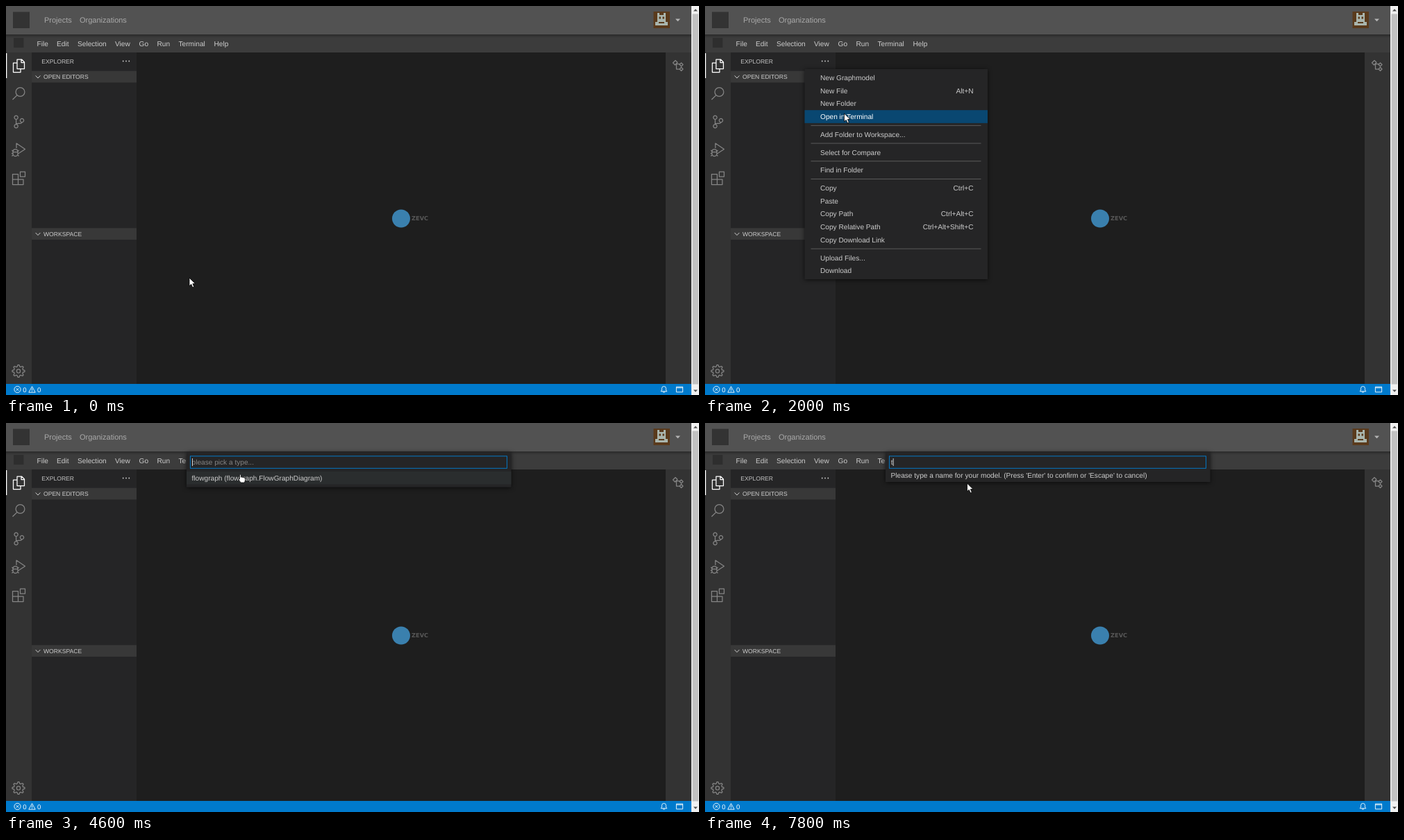
Animation, 998 px wide and 561 px high, one loop 8 s. Source, as an HTML page:

```html
<!DOCTYPE html>
<html lang="en">
<head>
<meta charset="utf-8">
<title>Workspace: new graph model</title>
<style>
html, body { margin: 0; width: 100%; height: 100%; overflow: hidden; background: #1e1e1e; }
svg { display: block; width: 998px; height: 561px; }
text { font-family: "Liberation Sans", Arial, sans-serif; text-rendering: geometricPrecision; white-space: pre; }
.icon { fill: none; stroke: #858585; stroke-width: 1.25; stroke-linejoin: round; }
.shadow { filter: drop-shadow(0 1px 3px #000a); }
</style>
</head>
<body>
<svg id="stage" viewBox="0 0 998 561">
  <defs>
    <linearGradient id="fade" x2="0" y2="1">
      <stop offset="0" stop-color="#000" stop-opacity=".3"/>
      <stop offset="1" stop-color="#000" stop-opacity="0"/>
    </linearGradient>
  </defs>
</svg>
<script>
const LOOP = 8000, STEP = 100, BLINK = 600;
const MENU_OPEN = 1100, PICK_OPEN = 3300, PICK_CLOSE = 6100, NAME_OPEN = 6200, TYPED = 7800;
const SMALL = 8.58, BODY = 10.15;
const stage = document.getElementById('stage');

function add(parent, tag, attrs, content) {
  const node = document.createElementNS('http://www.w3.org/2000/svg', tag);
  for (const key in attrs) node.setAttribute(key, attrs[key]);
  if (content) node.textContent = content;
  parent.appendChild(node);
  return node;
}
const group = (parent, attrs = {}) => add(parent, 'g', attrs);
const rect = (parent, x, y, width, height, fill, more) =>
  add(parent, 'rect', { x, y, width, height, fill, ...more });
const label = (parent, x, y, content, size = BODY, fill = '#ccc', more) =>
  add(parent, 'text', { x, y, 'font-size': size, fill, ...more }, content);
const icon = (parent, x, y, d, more) =>
  add(parent, 'path', { d, class: 'icon', transform: `translate(${x} ${y})`, ...more });
const ring = r => `M${-r} 0a${r} ${r} 0 1 0 ${2 * r} 0a${r} ${r} 0 1 0 ${-2 * r} 0`;
const show = (node, on) => node.setAttribute('visibility', on ? 'visible' : 'hidden');

function drawHeader(g) {
  rect(g, 0, 0, 987, 41, '#525252');
  rect(g, 0, 41, 987, 26, '#3c3c3c');
  rect(g, 0, 41, 987, 5, 'url(#fade)');
  rect(g, 10, 8.5, 24, 23.5, '#333');
  rect(g, 11, 46, 14.5, 14, '#2e2e2e');
  label(g, 55, 24, 'Projects', 11, '#a9a9a9');
  label(g, 106, 24, 'Organizations', 11, '#a9a9a9');
  const names = ['File', 'Edit', 'Selection', 'View', 'Go', 'Run', 'Terminal', 'Help'];
  const lefts = [44.5, 73, 103, 157, 191.5, 217.5, 248.5, 299.5];
  names.forEach((name, i) => label(g, lefts[i], 57.8, name));
  drawAvatar(g);
  add(g, 'path', { d: 'M964 18.5h7l-3.5 3.7z', fill: '#b5b5b5' });
}

function drawAvatar(parent) {
  const g = group(parent, { transform: 'translate(932 8)' }), tone = '#a9b5ad', dark = '#5a3a1c';
  rect(g, 0.5, 0, 23.5, 24, dark);
  rect(g, 6, 2, 12, 13, tone);
  rect(g, 9, 2, 6, 3, dark);
  rect(g, 8.5, 7.5, 2.5, 3, dark);
  rect(g, 13.5, 7.5, 2.5, 3, dark);
  rect(g, 3, 15, 18, 5, tone);
  rect(g, 8, 15, 8, 2, dark);
}

function drawActivityBar(g) {
  rect(g, 0, 67, 37, 478, '#333');
  rect(g, 0, 68, 1.3, 36, '#fff');
  icon(g, 18, 86, 'M-2-9H4.5L8.5-5V4.5H-2zM4-9V-4.5H8.5M-2-4H-7.5V9.5H3V4.5', { style: 'stroke:#fff' });
  icon(g, 20.5, 124, ring(6.4) + 'M-4.5 4.6L-11 11');
  const dot = (x, y) => `M${x - 2.6} ${y}a2.6 2.6 0 1 0 5.2 0a2.6 2.6 0 1 0 -5.2 0`;
  icon(g, 18, 167, dot(-3.4, -6.2) + dot(-3.4, 6.2) + dot(5, -2) + 'M-3.4-3.6V3.6M5 .6C5 4-3.4 1-3.4 3.6');
  icon(g, 18, 207, 'M-3-2V-9L9.5-.5L1 5M-8 2.5a3.6 3.6 0 0 1 7 0V6a3.5 3.5 0 0 1-7 0zM-8 3.5h7M-9.5 1l2 2M.5 1l-2 2M-10 5.5h2M-1 5.5h2M-9.5 9.5l2-2M.5 9.5l-2-2');
  icon(g, 18, 248, 'M-8.5-5.5H-.5V9.5H-8.5zM-8.5 2H7V9.5H-.5M7 2V9.5M2.5-9H9.5V-2H2.5z');
  let gear = '';
  for (let i = 0; i < 32; i++) {
    const a = (i - 0.5) * Math.PI / 16, r = i % 4 < 2 ? 9 : 6.6;
    gear += `${i ? 'L' : 'M'}${(r * Math.cos(a)).toFixed(2)} ${(r * Math.sin(a)).toFixed(2)}`;
  }
  icon(g, 18, 526.5, gear + 'z' + ring(2.6));
}

function drawSection(g, y, name) {
  rect(g, 37, y, 151, 16.7, '#383838');
  icon(g, 46, y + 8.5, 'M-3.4-1.8L0 1.8L3.4-1.8', { style: 'stroke:#ccc;stroke-width:1' });
  label(g, 54, y + 11.4, name, SMALL);
}

function drawFrame(g) {
  drawActivityBar(g);
  rect(g, 37, 67, 151, 478, '#252526');
  label(g, 51.3, 82.5, 'EXPLORER', SMALL, '#c4c4c4');
  for (const x of [168.7, 173, 177.3]) add(g, 'circle', { cx: x, cy: 79.5, r: 0.9, fill: '#ccc' });
  drawSection(g, 93.7, 'OPEN EDITORS');
  drawSection(g, 320.3, 'WORKSPACE');

  rect(g, 188, 67, 762, 478, '#1e1e1e');
  add(g, 'circle', { cx: 569, cy: 306.5, r: 13, fill: '#3a80ae' });
  label(g, 584, 309.3, 'ZEVC', 8.3, '#585858', { style: 'font:bold 8.3px "DejaVu Sans",sans-serif' });

  rect(g, 950, 67, 37, 478, '#333');
  icon(g, 967.5, 86, 'M-7-4L-3.5-7.5L-.5-4.5L-4-1zM2.5-1.5L5-4L7.5-1.5L5 1zM2.5 5L5 2.5L7.5 5L5 7.5zM-2-2.5H3M-2-2.5V5H2.5');

  rect(g, 0, 545, 987, 16, '#007acc');
  const white = { style: 'stroke:#fff;stroke-width:.9' };
  icon(g, 16.5, 553, ring(4.6) + 'M-1.8-1.8L1.8 1.8M1.8-1.8L-1.8 1.8', white);
  label(g, 24.2, 556.6, '0', 9.6, '#fff');
  icon(g, 37.5, 553, 'M0-4.3L4.7 4.2H-4.7zM0-1.5V1.6M0 2.3V3.2', white);
  label(g, 45, 556.6, '0', 9.6, '#fff');
  icon(g, 947.5, 553, 'M-4.3 2.8L-3 .8V-1.5a3 3 0 0 1 6 0V.8L4.3 2.8zM-1.2 3.2a1.2 1.2 0 0 0 2.4 0', white);
  icon(g, 970, 553, 'M-4.6-3.8H4.6V3.8H-4.6zM-4.6-2.3H4.6', white);

  rect(g, 987, 0, 11, 561, '#f1f1f1');
  rect(g, 988.5, 11.5, 8.5, 534, '#c1c1c1');
  add(g, 'path', { d: 'M990 7.5h6l-3-3.3zM990 553.5h6l-3 3.3z', fill: '#505050' });
}

function drawTools(g) {
  const shapes = [
    'M-1-4.5H2L4.5-2V4.5H-2M-5-3H-1M-3-5V-1',
    'M-5-3.5H-1.5L0-2H5V4H-5zM1 1H4M2.5-.5V2.5',
    'M4-2A4.4 4.4 0 1 0 4.4 1M4.5-4.5V-1.8H1.8',
    'M-2.5-4.5H4.5V2.5M-4.5-2.5H2.5V4.5H-4.5zM-2.8 1H.8'
  ];
  shapes.forEach((d, i) => icon(g, 136 + 14.5 * i, 328.7, d, { style: 'stroke:#c5c5c5;stroke-width:.9' }));
}

// A dash stands for a separator line.
const ENTRIES = ['New Graphmodel', 'New File|Alt+N', 'New Folder', 'Open in Terminal', '-',
  'Add Folder to Workspace...', '-', 'Select for Compare', '-', 'Find in Folder', '-',
  'Copy|Ctrl+C', 'Paste', 'Copy Path|Ctrl+Alt+C', 'Copy Relative Path|Ctrl+Alt+Shift+C',
  'Copy Download Link', '-', 'Upload Files...', 'Download'];
const ROW = 18.72, GAP = 7;

function drawMenu(g) {
  rect(g, 143.5, 91, 263.5, 303, '#252526', { class: 'shadow' });
  const rows = [];
  let y = 94;
  for (const entry of ENTRIES) {
    if (entry === '-') {
      rect(g, 152.5, y + 3, 245, 0.9, '#606060');
      y += GAP;
      continue;
    }
    const [name, keys] = entry.split('|');
    const bar = rect(g, 143.5, y, 263.5, ROW, '#094771');
    const texts = [label(g, 166, y + 13, name)];
    if (keys) texts.push(label(g, 386.5, y + 13, keys, BODY, '#ccc', { 'text-anchor': 'end' }));
    rows.push({ top: y, bar, texts });
    y += ROW;
  }
  return rows;
}

function drawBox(g, height) {
  rect(g, 260, 42, 467.5, height, '#252526', { class: 'shadow' });
  rect(g, 265.4, 47.8, 456, 17.5, '#252526', { stroke: '#007fd4', 'stroke-width': 0.9 });
}

const base = group(stage);
drawHeader(base);
drawFrame(base);
const tools = group(base);
drawTools(tools);

const menu = group(stage);
const rows = drawMenu(menu);

const picker = group(stage);
drawBox(picker, 50.5);
const hover = rect(picker, 260, 70, 467.5, 18.5, '#2a2d2e');
label(picker, 267.5, 60.3, 'please pick a type...', BODY, '#858585');
label(picker, 267.5, 82.6, 'flowgraph (flowgraph.FlowGraphDiagram)');

const namer = group(stage);
drawBox(namer, 43);
const hint = label(namer, 267.5, 60.3, 'Please type a name for the model', BODY, '#858585');
const typed = label(namer, 267.8, 60.3, 't');
label(namer, 267.5, 79, "Please type a name for your model. (Press 'Enter' to confirm or 'Escape' to cancel)");

const caret = rect(stage, 268, 51, 0.9, 11, '#ddd');

const pointer = group(stage);
const ink = { fill: '#fff', stroke: '#000', 'stroke-width': 0.8, 'stroke-linejoin': 'round' };
const arrow = add(pointer, 'path', { d: 'M0 0V11.8L2.7 9.3L4.7 13.8L6.8 12.9L4.9 8.5H8.6Z', ...ink });
const hand = add(pointer, 'path', {
  d: 'M2.4 .8Q3.4-.4 4.4 .8V4.2Q6 3.4 6.8 4.5Q8.2 3.9 8.9 5Q10.4 4.8 10.5 6.2V9L9.4 12H4.2L1 7.8Q.4 6.4 2.4 7Z', ...ink
});

// time, x, y of the pointer's hot spot
const TRACK = [
  [0, 264, 392], [200, 246, 396], [500, 180, 399], [800, 143, 394], [1300, 143, 394],
  [1400, 152, 368], [1500, 172, 322], [1600, 187, 291], [1900, 198.5, 166], [2000, 200.5, 155],
  [2200, 202, 118], [2300, 202, 111], [2400, 202, 107], [2500, 202, 107], [2600, 202, 106],
  [3600, 202, 106], [3900, 228, 100], [4200, 275, 91], [4500, 320, 81], [4600, 334, 74],
  [4800, 347, 75], [4900, 347, 75], [5200, 372, 75], [5400, 393, 75], [5500, 389.5, 75],
  [7000, 389.5, 75], [7400, 377.5, 87], [LOOP, 377.5, 87]
];

function place(time) {
  const i = Math.max(1, TRACK.findIndex(key => key[0] >= time));
  const [t0, x0, y0] = TRACK[i - 1], [t1, x1, y1] = TRACK[i];
  const k = Math.max(0, (time - t0) / (t1 - t0));
  return [x0 + (x1 - x0) * k, y0 + (y1 - y0) * k];
}

function render(time) {
  const t = Math.floor(time / STEP) * STEP;
  const [x, y] = place(t);
  const menuOn = t >= MENU_OPEN && t < PICK_OPEN;
  const pickOn = t >= PICK_OPEN && t < PICK_CLOSE;
  const nameOn = t >= NAME_OPEN;
  const done = t >= TYPED;

  show(menu, menuOn);
  const lagY = place(t - STEP)[1];
  for (const row of rows) {
    const lit = menuOn && lagY >= row.top && lagY < row.top + ROW;
    show(row.bar, lit);
    row.texts.forEach(node => node.setAttribute('fill', lit ? '#fff' : '#ccc'));
  }
  show(tools, x < 188 && t < 1400);

  const over = pickOn && x > 260 && y < 88;
  show(picker, pickOn);
  show(hover, over);
  show(namer, nameOn);
  show(hint, nameOn && !done);
  show(typed, done);

  const since = t - (done ? TYPED : nameOn ? NAME_OPEN : PICK_OPEN);
  show(caret, (pickOn || nameOn) && Math.floor(since / BLINK) % 2 === 0);
  caret.setAttribute('x', done ? 270.7 : 268);

  pointer.setAttribute('transform', `translate(${x} ${y})`);
  show(arrow, !over);
  show(hand, over);
}

const start = performance.now();
function tick() {
  render((performance.now() - start) % LOOP);
  requestAnimationFrame(tick);
}
tick();
</script>
</body>
</html>
```
